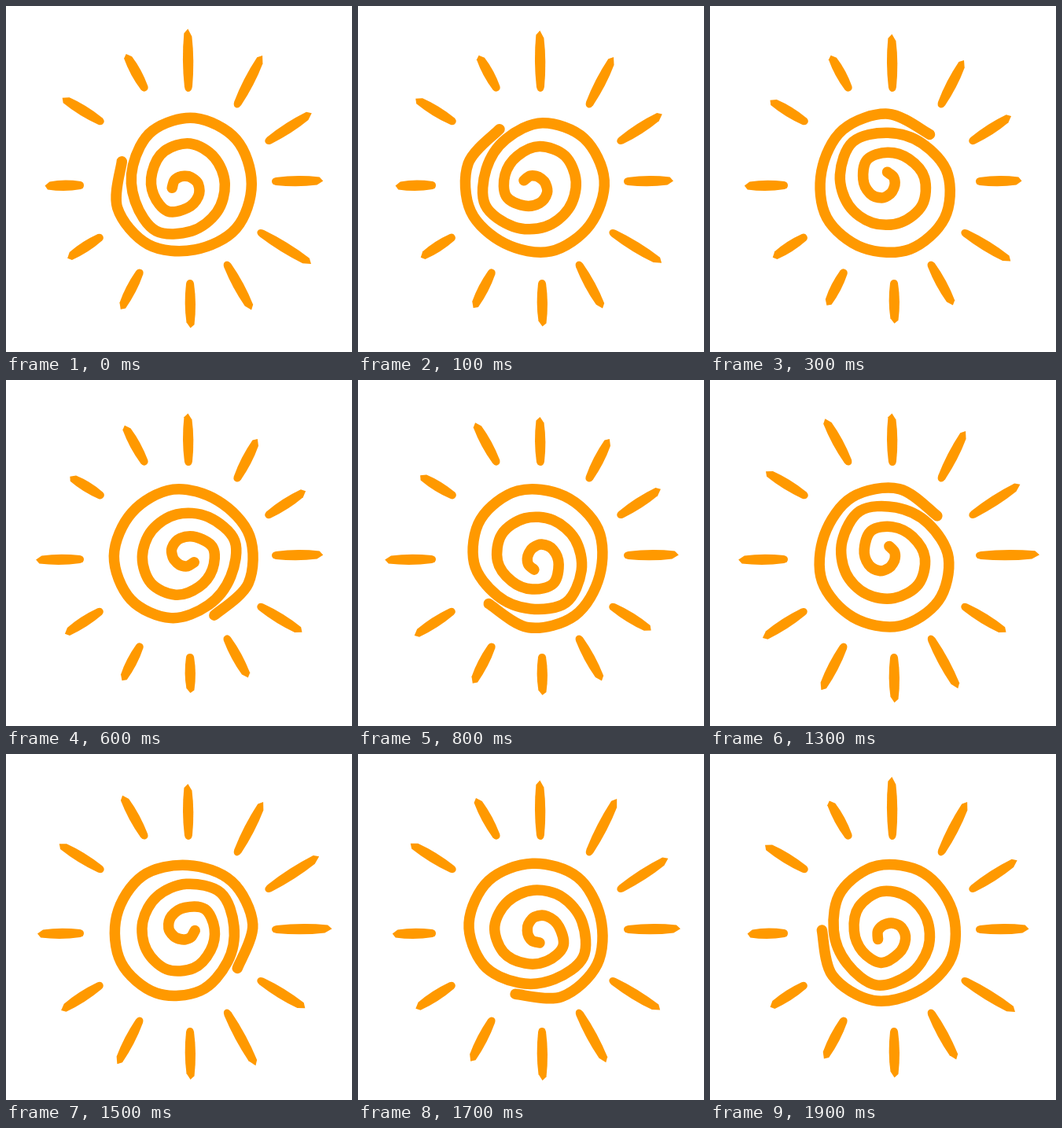
An HTML page for the animation above (2000 ms loop, 440 by 440 pixels).

```html
<!DOCTYPE html>
<html lang="en">
<head>
<meta charset="utf-8">
<title>Spiral sun</title>
<style>
  html, body { margin: 0; width: 100%; height: 100%; overflow: hidden; background: #fff; }
  svg { display: block; width: 100%; height: 100%; fill: #f90; }
  #spiral { fill: none; stroke: #f90; stroke-width: 13.5; stroke-linecap: round; stroke-linejoin: round; }
</style>
</head>
<body>
<svg viewBox="0 0 440 440">
  <path id="spiral"/>
  <g id="rays"></g>
</svg>
<script>
const STEP_MS = 100, STEPS = 20;
const TURN_PER_STEP = 720 / 19.5;
const CENTER = { x: 225.3, y: 226.2 };

// Hand-drawn spiral: one radius every 40 degrees, from the outer end inwards.
const SPIRAL_START = 200, SPIRAL_STEP = 40;
const spiralRadii = [
  83, 89, 89, 85, 88, 87, 88, 85, 78,
  68, 65, 69, 61, 56, 53, 52, 52, 48,
  42, 40, 40, 31, 25, 19, 13, 10, 10, 12, 15
];

// Inner ends, clockwise from the top, and the step at which each ray is shortest.
const rayStarts = [
  { x: 232, y: 109, shortest: 9.5 },
  { x: 292, y: 129, shortest: 7 },
  { x: 330, y: 174, shortest: 5 },
  { x: 338, y: 223, shortest: 3 },
  { x: 320, y: 286, shortest: 9.5 },
  { x: 279, y: 325, shortest: 5 },
  { x: 234, y: 348, shortest: 6.3 },
  { x: 172, y: 335, shortest: 4 },
  { x: 123, y: 292, shortest: 2 },
  { x: 99, y: 228, shortest: 0 },
  { x: 124, y: 149, shortest: 6.3 },
  { x: 178, y: 108, shortest: 2 }
];
const LONG_RAY = 58.5, SHORT_RAY = 49.5, STRETCH = 0.385;

// Unit length along x; half-widths in pixels along y.
const RAY_SHAPE = 'M0 0Q0 -4 .08 -5Q.5 -8.4 .93 -5L1 0L.88 5Q.5 8.2 .08 5Q0 4 0 0Z';

const radians = degrees => degrees * Math.PI / 180;

function spiralPoint(radius, i) {
  const angle = radians(SPIRAL_START - i * SPIRAL_STEP);
  return [CENTER.x + radius * Math.cos(angle), CENTER.y + radius * Math.sin(angle)];
}

// Catmull-Rom curve through the points, written as cubic segments.
function smoothPath(points) {
  const at = i => points[Math.max(0, Math.min(points.length - 1, i))];
  const control = (i, sign) =>
    at(i).map((v, axis) => v + sign * (at(i + 1)[axis] - at(i - 1)[axis]) / 6);
  return 'M' + points[0] + points.slice(1).map((p, i) =>
    `C${control(i, 1)} ${control(i + 1, -1)} ${p}`).join('');
}

// Rays sit about 30 degrees apart, leaning slightly towards the diagonals.
function rayAngle(i) {
  const angle = 30 * i - 90;
  return angle - 0.5 + 2.5 * Math.sin(radians(2 * angle));
}

// Linear swing: 0 at the shortest step, 1 half a loop later.
function swing(step, shortest) {
  const distance = Math.abs(step - shortest);
  return Math.min(distance, STEPS - distance) / (STEPS / 2);
}

const spiral = document.getElementById('spiral');
spiral.setAttribute('d', smoothPath(spiralRadii.map(spiralPoint)));

const rays = rayStarts.map((start, i) => {
  const path = document.createElementNS('http://www.w3.org/2000/svg', 'path');
  path.setAttribute('d', RAY_SHAPE);
  document.getElementById('rays').append(path);
  return { ...start, path, angle: rayAngle(i), length: i < 6 ? LONG_RAY : SHORT_RAY };
});

function draw() {
  const step = Math.floor(performance.now() / STEP_MS) % STEPS;
  spiral.setAttribute('transform', `rotate(${step * TURN_PER_STEP} ${CENTER.x} ${CENTER.y})`);
  for (const { path, x, y, angle, length, shortest } of rays) {
    const reach = length * (1 + STRETCH * swing(step, shortest));
    path.setAttribute('transform', `translate(${x} ${y}) rotate(${angle}) scale(${reach} 1)`);
  }
  requestAnimationFrame(draw);
}
draw();
</script>
</body>
</html>
```
